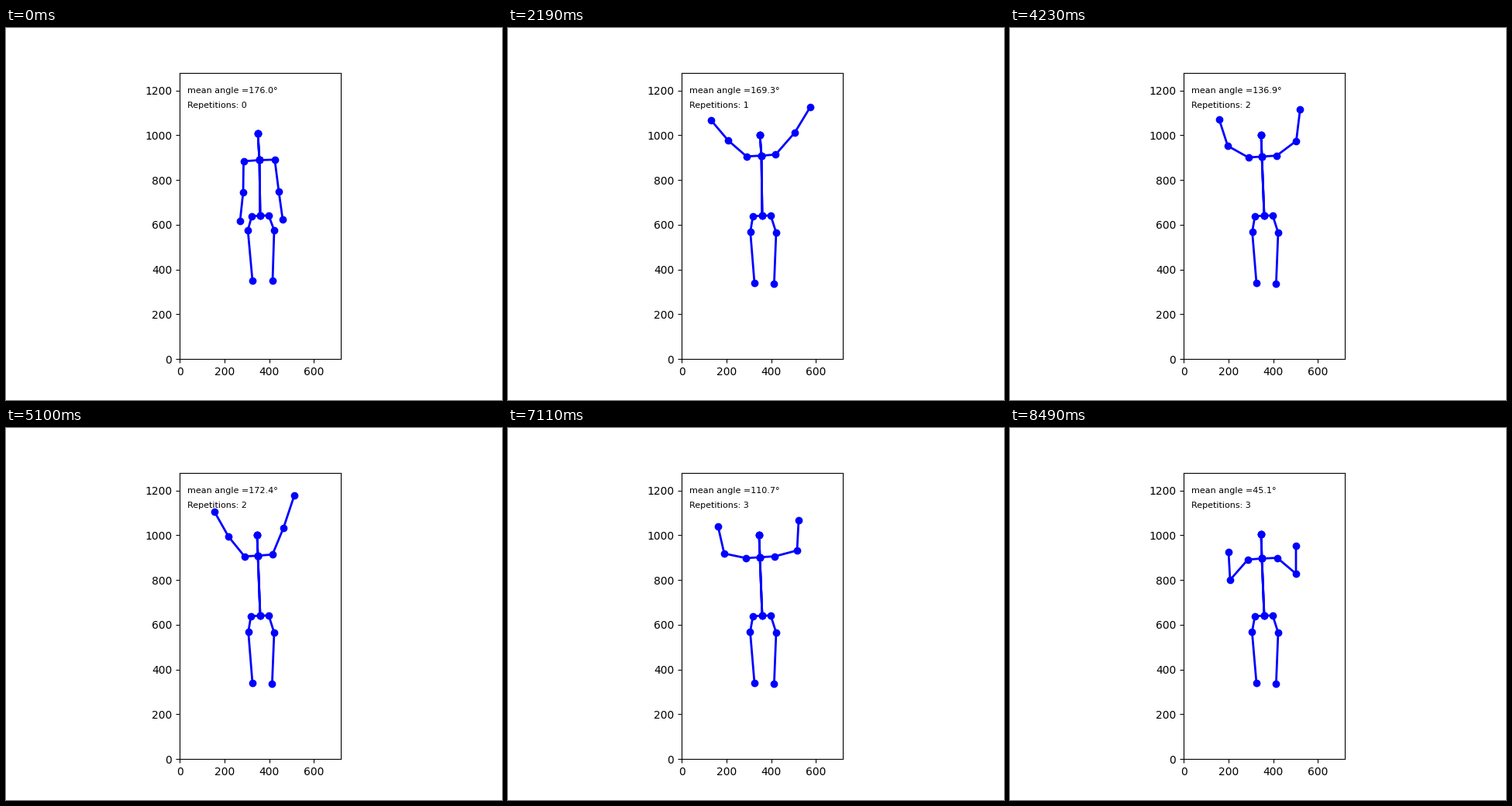
A matplotlib script that plays this animation: 640 px wide and 480 px high, repeating every 8.52 s.

```python
import numpy as np
import matplotlib.pyplot as plt
from matplotlib.animation import FuncAnimation

STEP, COUNT = 30, 284
TIMES = np.arange(COUNT) * STEP

# Key poses: elbow angle, shoulder lift, then x, y in screen pixels
# of the left elbow, right elbow, left wrist and right wrist
POSES = {
    "hang": (176.0, 0.15, 306, 212, 352, 211, 302, 249, 357, 247),
    "curl": (148.6, 0.0, 304, 213, 351, 211, 297, 223, 358, 218),
    "rack": (23.8, 0.0, 298, 211, 355, 209, 292, 180, 361, 176),
    "half": (45.1, 0.45, 284, 196, 369, 188, 282, 160, 369, 152),
    "side": (110.7, 0.7, 279, 162, 373, 158, 271, 127, 375, 119),
    "wide": (169.3, 1.0, 284, 145, 370, 135, 262, 119, 390, 102),
    "high": (172.4, 1.0, 287, 140, 358, 129, 269, 108, 372, 87),
}

# Each repetition: start, reach the top, leave the top, back down, top pose
REPS = [(1530, 2130, 2220, 3420, "wide"),
        (3480, 4560, 5100, 6390, "high"),
        (6450, 7650, 7710, 8750, "high")]


def schedule():
    stops = [(0, "hang"), (960, "hang"), (1320, "curl")]
    for start, top, leave, end, peak in REPS:
        rise, fall = top - start, end - leave
        stops += [(start, "rack"), (start + 0.25 * rise, "half"),
                  (start + 0.55 * rise, "side"), (top, peak), (leave, peak),
                  (leave + 0.4 * fall, "side"), (leave + 0.75 * fall, "half"),
                  (end, "rack")]
    return stops


def smooth(keys, values):
    """Sample a monotone cubic through the key values at every time step."""
    k, p = np.array(keys, float), np.array(values, float)
    h = np.diff(k)[:, None]
    s = np.diff(p, axis=0) / h
    a, b = s[:-1], s[1:]
    m = np.zeros_like(p)
    same = a * b > 0
    m[1:-1] = np.where(same, 2 * a * b / np.where(same, a + b, 1), 0)
    i = np.searchsorted(k, TIMES, "right") - 1
    u = (TIMES[:, None] - k[i, None]) / h[i]
    return ((1 + 2 * u) * (1 - u) ** 2 * p[i] + u * (1 - u) ** 2 * h[i] * m[i]
            + u * u * (3 - 2 * u) * p[i + 1] + u * u * (u - 1) * h[i] * m[i + 1])


def ease(start, end):
    u = np.clip((TIMES - start) / (end - start), 0, 1)
    return u * u * (3 - 2 * u)


def point(x, y):
    """Screen pixels to data units, one row per time step."""
    x, y = np.broadcast_arrays(x, y, TIMES)[:2]
    return np.stack([(x - 224.05) / 0.28875, (427.2 - y) / 0.28875], axis=1)


keys, names = zip(*schedule())
angle, lift, *arms = smooth(keys, [POSES[n] for n in names]).T
settle = ease(0, 1000)     # knees and ankles sink a little
drift = ease(2200, 3400)   # upper body leans left

joints = {
    "head": point(325 - drift, 136 + 1.5 * lift + 0.5 * drift),
    "neck": point(327 - 2 * drift, 171.5 - 6.8 * lift),
    "l_shoulder": point(306.3 + 1.5 * lift, 173 - 7.3 * lift),
    "r_shoulder": point(347 - 1.5 * drift - 1.7 * lift, 171 - 7.7 * lift),
    "pelvis": point(328, 242),
    "l_hip": point(317 - settle, 243),
    "r_hip": point(339, 242),
    "l_knee": point(312 + 0.7 * lift, 261 + 2 * settle),
    "r_knee": point(346, 261 + 3 * settle),
    "l_ankle": point(318, 326 + 3 * settle),
    "r_ankle": point(344 - 0.6 * settle, 326 + 3.6 * settle),
}
for j, name in enumerate(["l_elbow", "r_elbow", "l_wrist", "r_wrist"]):
    joints[name] = point(arms[2 * j], arms[2 * j + 1])

# One repetition each time the arms open past a right angle
reps = np.cumsum(np.r_[False, (angle[:-1] < 90) & (angle[1:] >= 90)])

CHAINS = [
    "head neck pelvis",
    "head neck pelvis l_hip l_knee l_ankle",
    "head neck pelvis r_hip r_knee r_ankle",
    "l_wrist l_elbow l_shoulder neck r_shoulder r_elbow r_wrist",
]
paths = [np.stack([joints[n] for n in c.split()], axis=1) for c in CHAINS]

fig, ax = plt.subplots(figsize=(6.4, 4.8), dpi=100)
ax.set(xlim=(0, 720), ylim=(0, 1280), aspect="equal")
lines = [ax.plot([], [], "o-", color="blue", lw=2)[0] for _ in CHAINS]
angle_text, reps_text = [
    ax.text(0.05, y, "", fontsize=8, va="top", transform=ax.transAxes)
    for y in (0.95, 0.9)
]


def update(i):
    for line, path in zip(lines, paths):
        line.set_data(*path[i].T)
    angle_text.set_text(f"mean angle ={angle[i]:.1f}°")
    reps_text.set_text(f"Repetitions: {reps[i]}")
    return [*lines, angle_text, reps_text]


anim = FuncAnimation(fig, update, frames=COUNT, interval=STEP, repeat=True, repeat_delay=0)
plt.show()
```
